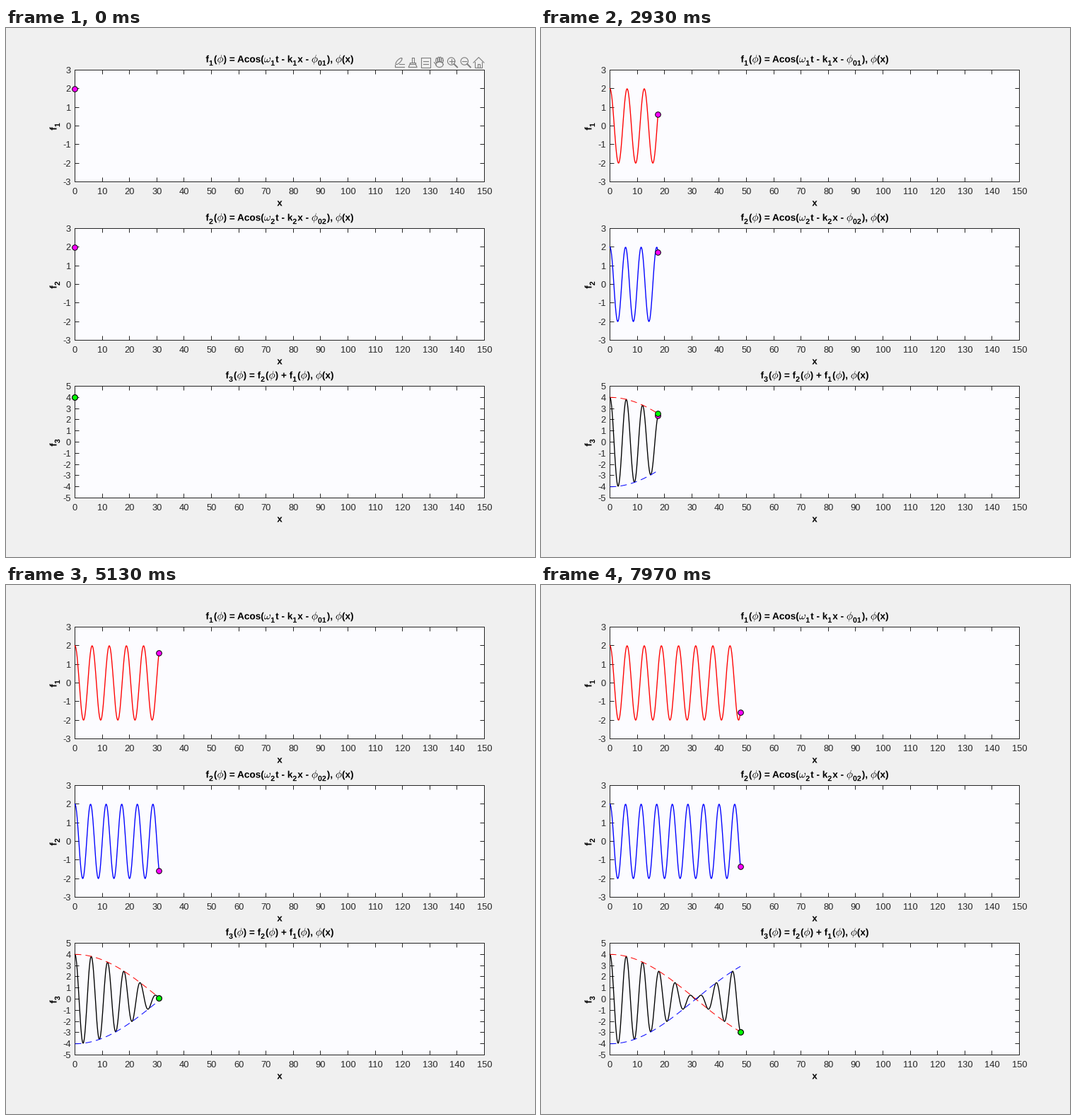
Animation, 748 px wide and 748 px high, one loop 8 s. Source, as a matplotlib script:

```python
import numpy as np
import matplotlib.pyplot as plt
from matplotlib.animation import FuncAnimation
from matplotlib.collections import LineCollection
from matplotlib.patches import PathPatch, Rectangle
from matplotlib.path import Path
from matplotlib.textpath import TextPath
from matplotlib.transforms import Affine2D

SIZE, DPI = 748, 64
PT = 72 / DPI                      # points per pixel
FRAMES, INTERVAL = 400, 20
STEP, RATE = 0.2, 0.03             # x per step, steps per ms
LEFT, RIGHT, HEIGHT = 97.5, 676.5, 158
INK, GREY = "#262626", "#7c7c7c"
FONT = "Liberation Sans"
PROP = {"family": FONT, "weight": "bold", "math_fontfamily": "cm"}
GREEK = {"ϕ": (r"$\phi$", 0.596), "ω": (r"$\omega$", 0.622)}   # glyph, em width

fig = plt.figure(figsize=(SIZE / DPI, SIZE / DPI), dpi=DPI, facecolor="#f0f0f0")
ax = fig.add_axes([0, 0, 1, 1])
ax.set(xlim=(0, SIZE), ylim=(SIZE, 0))
ax.axis("off")


def ink_width(s, size):
    return TextPath((0, 0), s, size=size, prop=PROP).get_extents().width


def advance(s, size):
    return ink_width("|" + s + "|", size) - ink_width("||", size)


def rich(x, y, markup, size, angle=0):
    """Centred bold text; parts split by '|', '_' marks a subscript."""
    paths, pen = [], 0
    for part in markup.split("|"):
        sub = part.startswith("_")
        s = part.lstrip("_")
        px = size * (0.78 if sub else 1)
        if s in GREEK:
            s, em = GREEK[s]
            px *= 1.12
            width = em * px
        else:
            width = advance(s, px) + sub
        paths.append(TextPath((pen, -0.34 * size * sub), s, size=px, prop=PROP))
        pen += width
    place = Affine2D().translate(-pen / 2, 0).rotate_deg(angle).scale(1, -1).translate(x, y)
    path = Path.make_compound_path(*paths).transformed(place)
    ax.add_patch(PathPatch(path, facecolor="black", lw=0))


def label(x, y, s, ha):
    ax.text(x, y, s, family=FONT, size=12.9 * PT, color=INK, ha=ha, va="baseline")


def to_x(x):
    return LEFT + np.asarray(x) * (RIGHT - LEFT) / 150


def crisp(v):
    return np.floor(v) + 0.5


class Panel:
    def __init__(self, top, limit, title, name):
        self.mid, self.scale = top + HEIGHT / 2, HEIGHT / (2 * limit)
        bottom = top + HEIGHT
        ax.add_patch(Rectangle((LEFT, top), RIGHT - LEFT, HEIGHT, facecolor="#fcfcff",
                               edgecolor=INK, linewidth=PT, snap=False))
        ticks = []
        for v in range(0, 151, 10):
            x = crisp(to_x(v))
            ticks += [[(x, top), (x, top + 6)], [(x, bottom), (x, bottom - 6)]]
            label(x, bottom + 17.5, str(v), "center")
        for v in range(-limit, limit + 1):
            y = crisp(self.to_y(v))
            ticks += [[(LEFT, y), (LEFT + 6, y)], [(RIGHT, y), (RIGHT - 6, y)]]
            label(92, y + 4.6, str(v), "right")
        ax.add_collection(LineCollection(ticks, colors=INK, linewidths=PT,
                                         snap=False, zorder=1.5))
        rich(387, top - 11, title, 13.6)
        rich(387, bottom + 34, "x", 13.4)
        rich(71.5, self.mid + 0.5, name, 13.6, 90)

    def to_y(self, v):
        return self.mid - v * self.scale

    def line(self, func, color, width=1.35, **style):
        art, = ax.plot([], [], color=color, lw=width * PT, zorder=3, **style)
        return self, art, func

    def dot(self, func, color, z):
        art, = ax.plot([], [], "o", ms=7.6 * PT, mfc=color, mec="black",
                       mew=PT, zorder=z)
        return self, art, func


def wave1(x):
    return 2 * np.cos(x)


def wave2(x):
    return 2 * np.cos(1.1 * x)


def total(x):
    return wave1(x) + wave2(x)


def upper(x):
    return 4 * np.cos(0.05 * x)


def lower(x):
    return -upper(x)


def wave_title(n):
    return f"f|_{n}|(|ϕ|) = Acos(|ω|_{n}|t - k|_{n}|x - |ϕ|_0{n}|), |ϕ|(x)"


def toolbar():
    """Row of seven small outline icons, each drawn around its own centre."""
    arts = []
    turn = np.linspace(0, 2 * np.pi, 40)
    export, brush, tip, hand, plus, minus, home = 556.5 + 18.65 * np.arange(7)
    cy = 48.5

    def stroke(cx, *points, width=1.1):
        x, y = np.transpose(points)
        arts.extend(ax.plot(cx + x, cy + y, color=GREY, lw=width * PT, zorder=6))

    def box(cx, x, y, w, h):
        stroke(cx, (x, y), (x + w, y), (x + w, y + h), (x, y + h), (x, y))

    def oval(cx, x, y, rx, ry, tilt=0):
        u, v = rx * np.cos(turn), ry * np.sin(turn)
        c, s = np.cos(tilt), np.sin(tilt)
        stroke(cx, *zip(x + u * c - v * s, y + u * s + v * c))

    oval(export, -1, -1.5, 6, 2.2, -0.8)
    stroke(export, (-6, 3), (-6, 6), (7, 6))
    stroke(export, (0, 2.5), (7, 2.5))

    box(brush, -1, -7, 3, 7)
    box(brush, -4, 0, 8, 2.5)
    stroke(brush, (-4, 2.5), (-6, 7), (6, 7), (4, 2.5))

    box(tip, -6.5, -7, 13, 14)
    for y in (-2, 2):
        stroke(tip, (-3.5, y), (3.5, y))

    for i in range(4):
        oval(hand, 2.6 * i - 3.4, -2.5 - 1.5 * np.sin(i), 1.3, 3.6)
    oval(hand, 0.5, 3, 5.2, 4)
    stroke(hand, (-4, 4), (-7, 0))

    for cx in (plus, minus):
        oval(cx, -1.5, -1.5, 5.2, 5.2)
        stroke(cx, (2.5, 2.5), (7, 7), width=1.9)
        stroke(cx, (-4.5, -1.5), (1.5, -1.5))
    stroke(plus, (-1.5, -4.5), (-1.5, 1.5))

    stroke(home, (-7.5, 0.5), (0, -7), (7.5, 0.5))
    stroke(home, (-5, -1), (-5, 7), (5, 7), (5, -1))
    box(home, -1.5, 2, 3, 5)
    return arts


p1 = Panel(59.5, 3, wave_title(1), "f|_1")
p2 = Panel(283.5, 3, wave_title(2), "f|_2")
p3 = Panel(506.5, 5, "f|_3|(|ϕ|) = f|_2|(|ϕ|) + f|_1|(|ϕ|), |ϕ|(x)", "f|_3")

dash = {"width": 1.0, "dashes": (9, 6), "dash_capstyle": "butt"}
lines = [
    p1.line(wave1, "red"),
    p2.line(wave2, "blue"),
    p3.line(total, "black"),
    p3.line(upper, "red", **dash),
    p3.line(lower, "blue", **dash),
]
dots = [
    p1.dot(wave1, "magenta", 4),
    p2.dot(wave2, "magenta", 4),
    p3.dot(total, "magenta", 4),
    p3.dot(upper, "lime", 5),
]
icons = toolbar()


def update(frame):
    # the picture changes on a 10 ms grid, hence the small lead
    time = (frame + 0.5) * INTERVAL
    k = int((time + 4) * RATE)
    x = np.arange(k + 1) * STEP
    for panel, art, func in lines:
        art.set_data(to_x(x), panel.to_y(func(x)))
    for panel, art, func in dots:
        art.set_data(to_x(x[-1:]), panel.to_y(func(x[-1:])))
    for art in icons:
        art.set_visible(k == 0)
    return []


anim = FuncAnimation(fig, update, frames=FRAMES, init_func=lambda: update(0),
                     interval=INTERVAL, repeat=True, repeat_delay=0)
plt.show()
```
